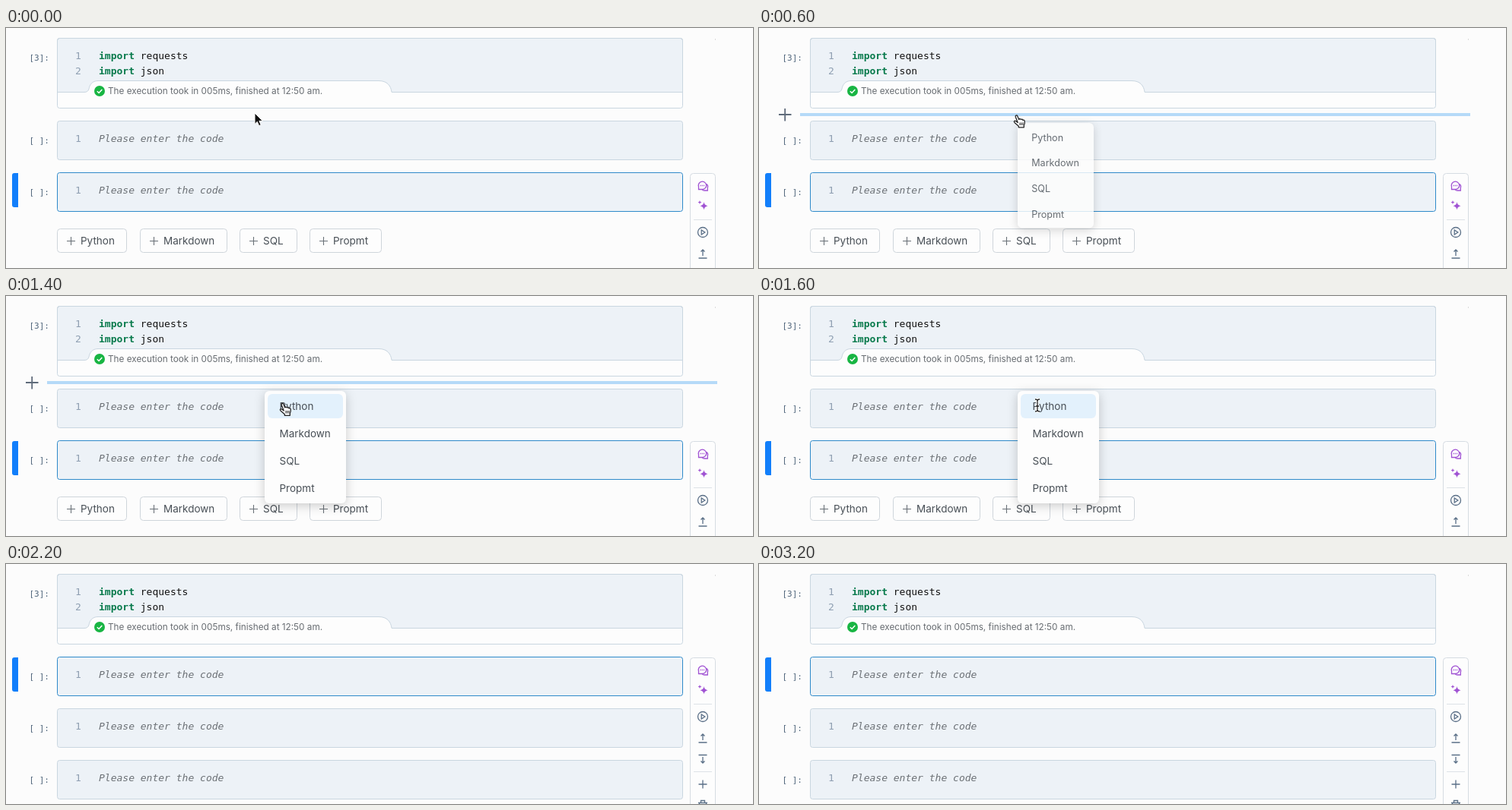
These frames come from a looping animation (982 by 316 pixels, 3.4 s). An HTML page:

```html
<!DOCTYPE html>
<html lang="en">
<head>
<meta charset="utf-8">
<title>Notebook: insert a cell</title>
<style>
html, body { margin: 0; width: 100%; height: 100%; overflow: hidden; background: #fcfcfc; }
svg { display: block; width: 982px; height: 316px; fill: none; }
text { white-space: pre; }
.code { font: 13px "DejaVu Sans Mono", monospace; fill: #111; }
.key { font-weight: bold; fill: #087a4c; }
.num { fill: #8f9fb2; }
.hint { font-style: italic; fill: #6c7176; }
.label { font: 11px "DejaVu Sans Mono", monospace; fill: #50667c; text-anchor: end; }
.ui { font: 13.5px Inter, sans-serif; fill: #484f56; }
.note { font: 11.75px Inter, sans-serif; fill: #666b70; }
.cell { fill: #edf2f7; stroke: #c9d6e0; }
.active { stroke: #2f8aca; }
.button { fill: #fdfdfd; stroke: #cfd5db; }
.panel { fill: #fdfdfd; filter: drop-shadow(0 3px 7px #0003); }
.icon { stroke: #5a6f87; stroke-width: 1.3; }
.ai { stroke: #a052d3; stroke-width: 1.3; }
</style>
</head>
<body>
<svg id="stage" viewBox="0 0 982 316">
  <path d="M932 15h1" stroke="#bbb"/>
  <text class="label" x="57" y="43">[3]:</text>
  <rect x="67.5" y="13.5" width="822" height="92" rx="3" fill="#fdfdfd"/>
  <path d="M67.5 84.5V16.5q0-3 3-3H886.5q3 0 3 3V84.5H507C506 76 501 69.5 490 69.5H121C113 69.5 110 75 109 80Q108 84.5 103 84.5Z" fill="#edf2f7" stroke="#c9d6e0"/>
  <rect x="67.5" y="13.5" width="822" height="92" rx="3" stroke="#c9d6e0"/>
  <text class="code" x="91" y="41"><tspan class="num">1</tspan><tspan class="key" x="122">import</tspan> requests</text>
  <text class="code" x="91" y="61"><tspan class="num">2</tspan><tspan class="key" x="122">import</tspan> json</text>
  <circle cx="123" cy="83" r="7" fill="#18b543"/>
  <path d="M119.8 83.2l2.3 2.3 4.2-4.6" stroke="#fff" stroke-width="1.5"/>
  <text class="note" x="134" y="87.3">The execution took in 005ms, finished at 12:50 am.</text>
  <g id="cells"></g>
  <g id="buttons"></g>
  <g id="focus">
    <path d="M16 191v45h-5q-3 0-3-3V194q0-3 3-3Z" fill="#127ffb"/>
    <rect x="899.5" y="191.5" width="33" height="220" rx="4" fill="#fdfdfd" stroke="#d6dce2"/>
    <path d="M904 252.5h24M904 341.5h24" stroke="#dde2e7"/>
    <g class="ai" transform="translate(916 208)">
      <path d="M-5.5 4.5V1A5.2 5.2 0 1 1 0 4.5ZM5 -2.5A4.5 4.5 0 0 1 6.3 2.5V6H2Q0 6-1 4.7"/>
      <path d="M-3.5-.5h1.2m1 0h1.2m1 0h1.2"/>
    </g>
    <g transform="translate(916 233)" fill="#a052d3">
      <path d="M1.5-4Q2 .5 6.5 1.2 2 2 1.5 6.5 1 2-3.5 1.2 1 .5 1.5-4ZM-4-6Q-3.8-3.7-1.5-3.5-3.8-3.3-4-1-4.2-3.3-6.5-3.5-4.2-3.7-4-6Z"/>
    </g>
    <g class="icon">
      <circle cx="916" cy="269" r="6.5"/>
      <path d="M914.2 266v6l4.6-3Z"/>
      <path d="M916 300v-8m-2.5 2.5l2.5-2.5 2.5 2.5M910.5 303h11"/>
      <path d="M910.5 319.5h11M916 322v8m-2.5-2.5l2.5 2.5 2.5-2.5"/>
      <path d="M910.5 358h11m-5.500-5.500v11"/>
      <path d="M910 382.500h12M913.500 382v-2.500h5v2.500M911.500 383v8h9v-8"/>
    </g>
  </g>
  <g id="insert">
    <path d="M54 114H935" stroke="#b5daf8" stroke-width="4"/>
    <path d="M26 114h16.500M34.200 106v16.500" stroke="#5f6b7a" stroke-width="1.800"/>
  </g>
  <g id="menu">
    <rect class="panel" width="107" height="148" rx="6"/>
    <rect id="hover" x="4" y="4" width="99" height="32" rx="6" fill="#e3f1fc"/>
  </g>
  <g id="arrow">
    <path d="M0 0V14.500L3.300 11.400 5.600 16.700 8.200 15.600 5.900 10.400H10.400Z" fill="#111" stroke="#fff"/>
  </g>
  <g id="hand" stroke-linejoin="round">
    <path d="M6.200 10.500L3.300 3.200C2.500.900 5 .200 5.800 2L7.700 6.400C8.500 5 10 5.400 10.400 6.600 11.300 5.700 12.500 6 12.800 7.300 14 6.700 15 7.400 15.200 8.800 15.500 11 15.300 12.500 14.300 14V16.800H7.300V15.200L2.200 10.700C.300 8.900 2 7.600 3.800 8.700Z" fill="#fff" stroke="#222" stroke-width="1.300"/>
    <path d="M9 10.500v3.500M11 10.500v3.500M13 10.500v3.500" stroke="#222"/>
  </g>
  <g id="beam">
    <path id="beamPath" d="M-3-8Q0-8 0-6Q0-8 3-8M0-6V6M-3 8Q0 8 0 6Q0 8 3 8M-2 1H2" stroke="#fff" stroke-width="3"/>
    <use href="#beamPath" style="stroke:#222"/>
    <path d="M-3-8Q0-8 0-6Q0-8 3-8M0-6V6M-3 8Q0 8 0 6Q0 8 3 8M-2 1H2" stroke="#222" stroke-width="1.300"/>
  </g>
</svg>
<script>
const $ = id => document.getElementById(id);
const add = (id, markup) => $(id).insertAdjacentHTML('beforeend', markup);
const kinds = ['Python', 'Markdown', 'SQL', 'Propmt'];

for (const y of [122.5, 190.5, 258.5]) add('cells', `<g>
  <text class="label" x="57" y="${y + 29.5}">[ ]:</text>
  <rect class="cell" x="67.5" y="${y}" width="822" height="51" rx="3"/>
  <text class="code" x="91" y="${y + 27.5}"><tspan class="num">1</tspan><tspan class="hint" x="122">Please enter the code</tspan></text></g>`);

[[67, 92], [176, 115], [307, 76], [399, 95]].forEach(([x, w], i) => add('buttons', `
  <rect class="button" x="${x + .5}" y="264.5" width="${w - 1}" height="31" rx="4"/>
  <path d="M${x + 13} 280.5h11m-5.5-5.5v11" stroke="#6a7178" stroke-width="1.1"/>
  <text class="ui" x="${x + 31}" y="285">${kinds[i]}</text>`));

kinds.forEach((kind, i) => add('menu', `<text class="ui" x="19.500" y="${25.3 + 36 * i}">${kind}</text>`));

const STEP = 200, LOOP = 3400;
// Pointer by step: shape, x, y
const pointer = [
  ['arrow', 327, 112], ['hand', 332, 110], ['hand', 334, 114], ['hand', 334, 114], ['hand', 346, 127],
  ['hand', 359, 140.5], ['hand', 359, 140.5], ['hand', 359, 140.5],
  ['beam', 366, 144], ['beam', 366, 144], ['beam', 366, 144]
];
const show = (id, on) => $(id).style.display = on ? '' : 'none';
const place = (id, x, y, scale = 1) => $(id).setAttribute('transform', `translate(${x} ${y}) scale(${scale})`);

function draw(now) {
  const t = Math.floor(now % LOOP / STEP) * STEP;
  const added = t >= 1800;

  [...$('cells').children].forEach((cell, i) => {
    cell.style.display = i < 2 || added ? '' : 'none';
    cell.querySelector('rect').classList.toggle('active', i === (added ? 0 : 1));
  });
  show('buttons', !added);
  place('focus', 0, added ? -68 : 0);
  show('insert', t >= 200 && t < 1600);

  show('menu', t >= 600 && t < 2000);
  place('menu', 340, added ? 193 : 125, t === 600 ? .934 : added ? .953 : 1);
  $('menu').style.opacity = t === 600 || added ? .82 : 1;
  show('hover', t >= 1200);

  const [shape, x, y] = pointer[t / STEP] || [];
  for (const id of ['arrow', 'hand', 'beam']) show(id, id === shape);
  if (shape) place(shape, x, y);
  requestAnimationFrame(draw);
}

const start = performance.now();
requestAnimationFrame(() => draw(0));
function tick() { return performance.now() - start; }
const frame = draw;
draw = () => frame(tick());
</script>
</body>
</html>
```
